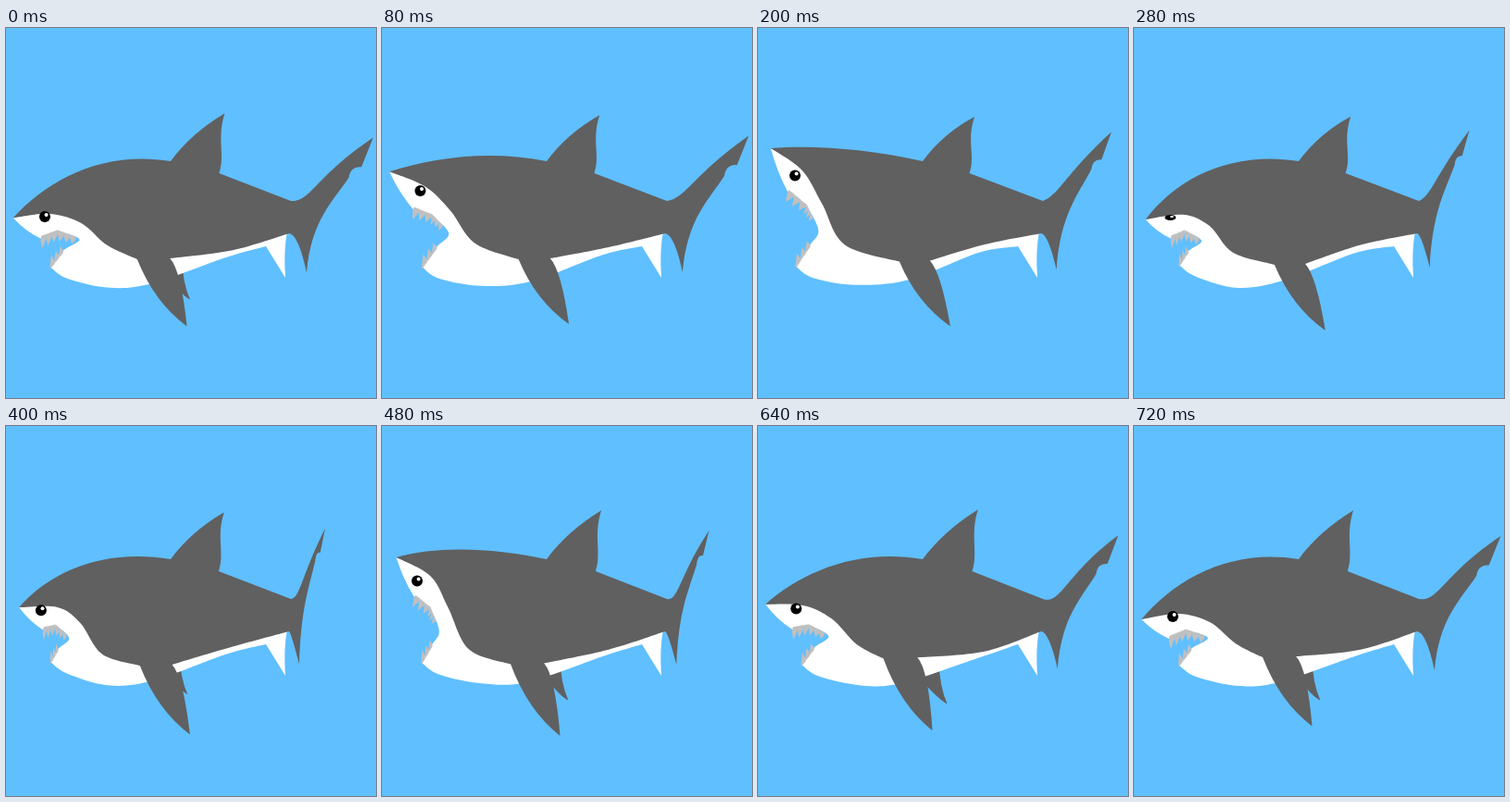
Animation, 400 px wide and 400 px high, one loop 0.76 s. Source, as an HTML page with a canvas:

```html
<!DOCTYPE html>
<html lang="en">
<head>
<meta charset="utf-8">
<title>Swimming shark</title>
<style>
  html, body { margin: 0; width: 100%; height: 100%; overflow: hidden; background: #60bfff; }
  canvas { display: block; width: 400px; height: 400px; }
</style>
</head>
<body>
<canvas id="stage" width="400" height="400"></canvas>
<script>
const ctx = document.getElementById('stage').getContext('2d');
const LOOP = 760, STEP = 40;
const SKY = '#60bfff', GREY = '#606060', WHITE = '#fff', TOOTH = '#c0c0c0';

const smooth = k => k * k * (3 - 2 * k);
const wave = ms => Math.sin(2 * Math.PI * ms / LOOP);

// Jaw opening, 0 to 1: two bites per loop, slow to open and quick to shut.
function biteAt(t) {
  const phase = (t + 22) % (LOOP / 2), opening = 192, closing = 120;
  if (phase < opening) return smooth(phase / opening);
  return smooth(Math.max(0, 1 - (phase - opening) / closing));
}

function poseAt(t) {
  const bite = biteAt(t);
  const sway = (1 + wave(t - 210)) / 2;
  const turn = sway ** 1.6;
  const paddle = wave(t - 30);
  const blink = Math.max(0, 1 - Math.abs(t - 280) / 60);
  // A head point: its resting place, its shift on a full bite and on a full turn.
  const head = (x, y, biteX, biteY, turnX, turnY) =>
    [x + biteX * bite + turnX * turn, y + biteY * bite + turnY * turn];
  const arc = 4 * bite * (1 - bite);

  return {
    bite, paddle,
    snout: add(head(8, 209, 7, -91, 7, 0), [-4, -4], arc),
    crown: head(45, 165, 16, -44, 4, -6),
    nape: head(105, 132, 15, -2, 4, 1),
    brow: head(48, 203, -3, -58, 8, 0),
    cheek: head(82, 212, -15, -27, 0, 4),
    throat: head(110, 235, -18, -5, -4, 12),
    eye: head(42, 206, -1, -55, -4, 0),
    lid: 6 - 3 * blink,
    lip: head(38, 230, -8, -62, 3, -2),
    palate: head(56, 222, -4, -34, -2, -1),
    corner: head(80, 229, -14, -13, -10, 2),
    gum: head(62, 241, -5, -8, -5, 1),
    jaw: head(48, 258, -9, 0, 1, -3),
    belly: head(113, 281, -8, -4, 0, 0),
    chest: [160 + 4 * paddle, 275 - 3 * paddle],
    vent: [238, 247 - 4 * paddle],
    flank: [245, 239 - 5 * paddle],
    finFront: [144 + 9 * paddle, 250 + 9 * turn],
    finRear: [179 + 7 * paddle, 249 + 9 * turn],
    finTip: [198 + 10 * paddle, 327.5 + 7.5 * wave(t - 290)],
    farTip: [197 - 8 * paddle, 291 - 10 * paddle],
    dorsal: [236 - 2 * paddle, 93 + 3 * paddle],
    dorsalEnd: [230 - 1.5 * paddle, 157],
    tail: [397 - 52 * turn, 118 - 7 * sway - 2.5 * paddle],
    tailLow: [325 - 8 * turn, 264.5 - 7 * sway]
  };
}

const add = (p, q, k = 1) => [p[0] + q[0] * k, p[1] + q[1] * k];
const mix = (p, q, k) => [p[0] + (q[0] - p[0]) * k, p[1] + (q[1] - p[1]) * k];
const line = (...points) => points.forEach(p => ctx.lineTo(...p));
const quad = (c, p) => ctx.quadraticCurveTo(...c, ...p);
const cubic = (c, d, p) => ctx.bezierCurveTo(...c, ...d, ...p);

function spline(...pts) {
  line(pts[0]);
  for (let i = 0; i < pts.length - 1; i++) {
    const a = pts[i], b = pts[i + 1];
    const before = pts[i - 1] || a, after = pts[i + 2] || b;
    cubic(add(a, [b[0] - before[0], b[1] - before[1]], 1 / 6),
          add(b, [a[0] - after[0], a[1] - after[1]], 1 / 6), b);
  }
}

function shape(color, trace) {
  ctx.fillStyle = color;
  ctx.beginPath();
  trace();
  ctx.closePath();
  ctx.fill();
}

function ellipse(color, [x, y], rx, ry) {
  shape(color, () => ctx.ellipse(x, y, rx, ry, 0, 0, 2 * Math.PI));
}

// A row of tapering teeth; `root` is how far the gum reaches along them.
function teeth(along, count, reach, root, taper) {
  for (let i = 0; i < count; i++) {
    const k = 1 - taper * i / count, v = [reach[0] * k, reach[1] * k];
    const a = along(i / count), b = along((i + 1) / count);
    shape(TOOTH, () => line(add(a, v, -.25), add(b, v, -.25), add(b, v, root),
      add(mix(a, b, .45), v), add(a, v, root)));
  }
}

function drawFarFin(p) {
  shape(GREY, () => {
    line([p.finRear[0] - 12, 252], add(p.farTip, [-9, -45]));
    quad(add(p.farTip, [-8, -18]), p.farTip);
    quad(add(p.farTip, [-9, -4]), [p.finRear[0], 270]);
  });
}

function drawUnderside(p) {
  shape(WHITE, () => {
    line(p.snout);
    quad(add(mix(p.snout, p.lip, .5), [-2, 3]), p.lip);
    spline(p.lip, p.palate, p.corner, p.gum, p.jaw);
    spline(p.jaw, add(p.jaw, [19, 13]), p.belly, p.chest, p.vent, [281, 236]);
    line([302, 270]);
    quad([300, 240], [304, 220]);
    // The top edge runs beneath the grey back.
    line(add(p.flank, [0, -8]), add(p.finRear, [0, -8]), add(p.throat, [15, -8]),
      add(p.cheek, [12, -6]), add(p.brow, [12, -6]));
  });
}

function drawTeeth(p) {
  const end = mix(p.palate, p.corner, .85 - .4 * p.bite);
  const upper = k => k < .5 ? mix(p.lip, p.palate, k * 2) : mix(p.palate, end, k * 2 - 1);
  teeth(upper, 6, [-1 - 5 * p.bite, 12 - 4 * p.bite], .25 * (1 - p.bite), .5);
  teeth(k => mix(p.jaw, p.gum, k), 3, [-1, -10], .1, .3);
}

function traceTail(p) {
  const tip = p.tail, low = p.tailLow, span = tip[0] - 309;
  const notch = add(tip, [-.145 * span, 22 + .11 * span]);
  const inner = add(tip, [-.3 * span, 30 + .15 * span]);
  const drop = [low[0] - inner[0], low[1] - inner[1]];
  line([308, 187]);
  cubic([310 + .22 * span, 187 - 7 * p.paddle], [310 + .28 * span, 160], tip);
  line(notch);
  quad([inner[0] + .02 * span, notch[1] - 1], inner);
  cubic([inner[0] + .39 * drop[0], inner[1] + .26 * drop[1]],
        [inner[0] + .89 * drop[0], inner[1] + .45 * drop[1]], low);
  quad([low[0] - 9, 223], [306, 222]);
}

function drawBack(p) {
  shape(GREY, () => {
    line(p.snout);
    cubic(p.crown, p.nape, [178, 144]);
    quad([200, 114], p.dorsal);
    cubic(add(p.dorsal, [-9, 27]), add(p.dorsalEnd, [7, -19]), p.dorsalEnd);
    traceTail(p);
    spline([306, 222], p.flank, p.finRear);
    spline(p.finFront, p.throat, p.cheek, p.brow, p.snout);
  });
}

function drawNearFin(p) {
  const { finFront: front, finTip: tip, finRear: rear } = p;
  shape(GREY, () => {
    line(front);
    quad([front[0] + .35 * (tip[0] - front[0]), front[1] + .65 * (tip[1] - front[1])], tip);
    quad(add(rear, [12, 13]), rear);
    line(add(rear, [-2, -8]), add(front, [6, -8]));
  });
}

function drawEye(p) {
  ellipse('#000', p.eye, 6, p.lid);
  ellipse(WHITE, add(p.eye, [1.6, -p.lid / 3]), 2, p.lid / 3);
}

function draw(t) {
  const pose = poseAt(t);
  ctx.fillStyle = SKY;
  ctx.fillRect(0, 0, 400, 400);
  for (const part of [drawFarFin, drawUnderside, drawTeeth, drawBack, drawNearFin, drawEye])
    part(pose);
}

const start = performance.now();
function tick() {
  const t = (performance.now() - start) % LOOP;
  draw(Math.floor(t / STEP) * STEP);
  requestAnimationFrame(tick);
}
tick();
</script>
</body>
</html>
```
